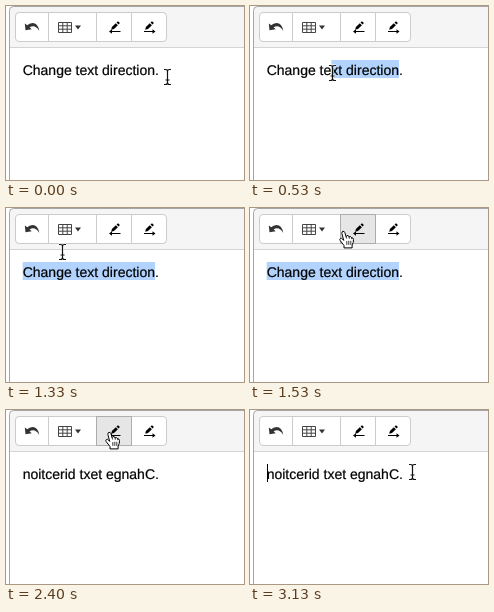
These frames come from a looping animation (238x174 px, 3270 ms). An HTML page:

```html
<!DOCTYPE html>
<html lang="en">
<head>
<meta charset="utf-8">
<title>Text direction</title>
<style>
  html, body { margin: 0; width: 100%; height: 100%; overflow: hidden; background: #fff; }
  svg { display: block; }
  text {
    font: 14px "Liberation Sans", Arial, sans-serif;
    text-rendering: geometricPrecision;
    stroke: #000;
    stroke-width: .2;
  }
</style>
</head>
<body>
<svg width="238" height="174" viewBox="0 0 238 174">
  <defs>
    <linearGradient id="inset" x2="0" y2="1">
      <stop offset="0" stop-opacity=".18"/>
      <stop offset=".3" stop-opacity="0"/>
    </linearGradient>
    <g id="pencil">
      <path d="M-2.6 1 1.3 -2.8 3.4 -.7 -.5 3.1 -3.3 3.8z M2 -3.5 3.5 -4.8 5.4 -2.9 4.1 -1.4z"/>
    </g>
    <path id="arrow" d="M-6 0 -3 -2.2V-.5H5.5V.5H-3V2.2z"/>
    <path id="beam" d="M-3.5 -7.5H-2Q0 -7.5 0 -5.5V5.5Q0 7.5 -2 7.5H-3.5M3.5 -7.5H2Q0 -7.5 0 -5.5M0 5.5Q0 7.5 2 7.5H3.5M-2 3H2"/>
  </defs>

  <!-- editor frame and toolbar -->
  <path d="M3.5 180V4.5Q3.5 .5 7.5 .5H240V41H4" fill="#f5f5f5"/>
  <path d="M4 42H240V180H4z" fill="#fff"/>
  <path d="M4 41.5H240" stroke="#d4d4d4"/>
  <path d="M3.5 180V4.5Q3.5 .5 7.5 .5H240" fill="none" stroke="#a6a6a6"/>
  <rect x="9.5" y="6.5" width="151" height="29" rx="3.5" fill="#fff" stroke="#ccc"/>
  <path d="M42.5 7V35M90.5 7V35M125.5 7V35" stroke="#ccc"/>
  <g id="button">
    <rect id="face" x="90.5" y="6.5" width="35" height="29"/>
    <rect id="shade" x="91" y="7" width="34" height="28" fill="url(#inset)"/>
  </g>

  <!-- icons -->
  <path d="M18.8 17.5 19.5 24.2 25.7 23.2 23.6 21.3Q29.3 18.3 33.2 25Q32 17 26.5 17Q23.3 17.2 21.2 19.2z" fill="#333"/>
  <path d="M52.5 16.5H65.5V26.5H52.5zM56.8 16.5V26.5M61.2 16.5V26.5M52.5 19.8H65.5M52.5 23.2H65.5" fill="none" stroke="#444"/>
  <path d="M69 19.5H75L72 23.5z" fill="#333"/>
  <use href="#pencil" x="108.5" y="20"/>
  <use href="#arrow" x="109" y="25.5"/>
  <use href="#pencil" x="142.5" y="20"/>
  <use href="#arrow" transform="translate(143.5 25.5) scale(-1 1)"/>

  <!-- content -->
  <rect id="mark" y="54" height="18" fill="#b1d3fd"/>
  <text id="words" x="16.7" y="69">Change text direction.</text>
  <path id="caret" d="M17.5 54V72" stroke="#000"/>

  <g id="ibeam" fill="none">
    <use href="#beam" stroke="#fff" stroke-width="2.6" stroke-opacity=".8"/>
    <use href="#beam" stroke="#111" stroke-width="1.2"/>
  </g>
  <g id="hand" stroke="#000" stroke-linejoin="round" stroke-linecap="round">
    <path fill="#fff" d="M-2.5 8.5V6.5L-6.3 1.6Q-7.2 .2 -6 -.6Q-5 -1.1 -3.9 .2L-2.8 1.4 -4.6 -5.4Q-4.9 -7.3 -3.5 -7.7Q-2.2 -8 -1.6 -6.3L-.4 -2.4Q.2 -3.8 1.5 -3.4Q2.4 -3.1 2.6 -2.1Q4.2 -3.2 5.2 -1.2Q6.8 -1.5 7 .6Q7.2 3.6 5.6 6V8.5z"/>
    <path fill="none" stroke-width=".8" d="M.3 2.5V5.5M2.3 2.2V5.5M4.3 2.2V5.5M-.4 -2.4 .1 -.8M2.6 -2.1 2.8 -.7M5.2 -1.2V-.2"/>
  </g>
</svg>
<script>
const $ = id => document.getElementById(id);
const LOOP = 3270, TICKS_PER_MS = .015;
const PLAIN = 'Change text direction', REVERSED = [...PLAIN].reverse().join('');
const PRESS = 27, RELEASE = 29, BLINK = 7.5;
const words = $('words');

const smooth = k => k * k * (3 - 2 * k);
const start = { x: 161, y: 71 };

// each move bends vertically by `bow` on its way to x, y
const drag = { from: 1, to: 16, x: 14, y: 70, bow: -3.5, ease: k => smooth(k ** .85) };
const toButton = { from: 18, to: 25, x: 107, y: 31, bow: -8.6, ease: k => 1 - (1 - k) ** 1.8 };
const toText = { from: 37, to: 47, x: 162, y: 62, bow: 6, ease: smooth };

function pointerAt(tick) {
  let { x, y } = start;
  for (const move of [drag, toButton, toText]) {
    const k = (tick - move.from) / (move.to - move.from);
    const e = move.ease(Math.min(1, Math.max(0, k)));
    x += (move.x - x) * e;
    y += (move.y - y) * e + move.bow * Math.sin(Math.PI * e);
  }
  return [Math.round(x), Math.round(y)];
}

const show = (id, on) => $(id).setAttribute('visibility', on ? 'visible' : 'hidden');

function set(id, attributes) {
  for (const name in attributes) $(id).setAttribute(name, attributes[name]);
}

const edges = [...PLAIN + '.'].map((_, i) => words.getStartPositionOfChar(i).x);
const nearestEdge = x => edges.reduce((a, b) => Math.abs(b - x) < Math.abs(a - x) ? b : a);

function draw(now) {
  // small lead absorbs the rounding of the tick length
  const tick = Math.floor((now % LOOP + 4) * TICKS_PER_MS);
  const [x, y] = pointerAt(tick);
  const onToolbar = y < 41;
  const pressed = tick >= PRESS && tick < RELEASE;
  const reversed = tick >= RELEASE;

  show('ibeam', !onToolbar);
  show('hand', onToolbar);
  set('ibeam', { transform: `translate(${x + .5} ${y})` });
  set('hand', { transform: `translate(${x - .5} ${y - 1})` });

  show('button', y < 36 && x > 90 && x < 126);
  set('face', pressed ? { fill: '#cacaca', stroke: '#8c8c8c' } : { fill: '#e6e6e6', stroke: '#adadad' });
  set('shade', { opacity: pressed ? 1 : 0 });

  const left = tick <= drag.to ? nearestEdge(x) : edges[0];
  set('mark', { x: left, width: reversed ? 0 : edges.at(-1) - left });

  const line = (reversed ? REVERSED : PLAIN) + '.';
  if (words.textContent !== line) words.textContent = line;
  show('caret', reversed && Math.floor((tick - RELEASE + .5) / BLINK) % 2 === 0);
}

function loop() {
  draw(performance.now());
  requestAnimationFrame(loop);
}
loop();
</script>
</body>
</html>
```
